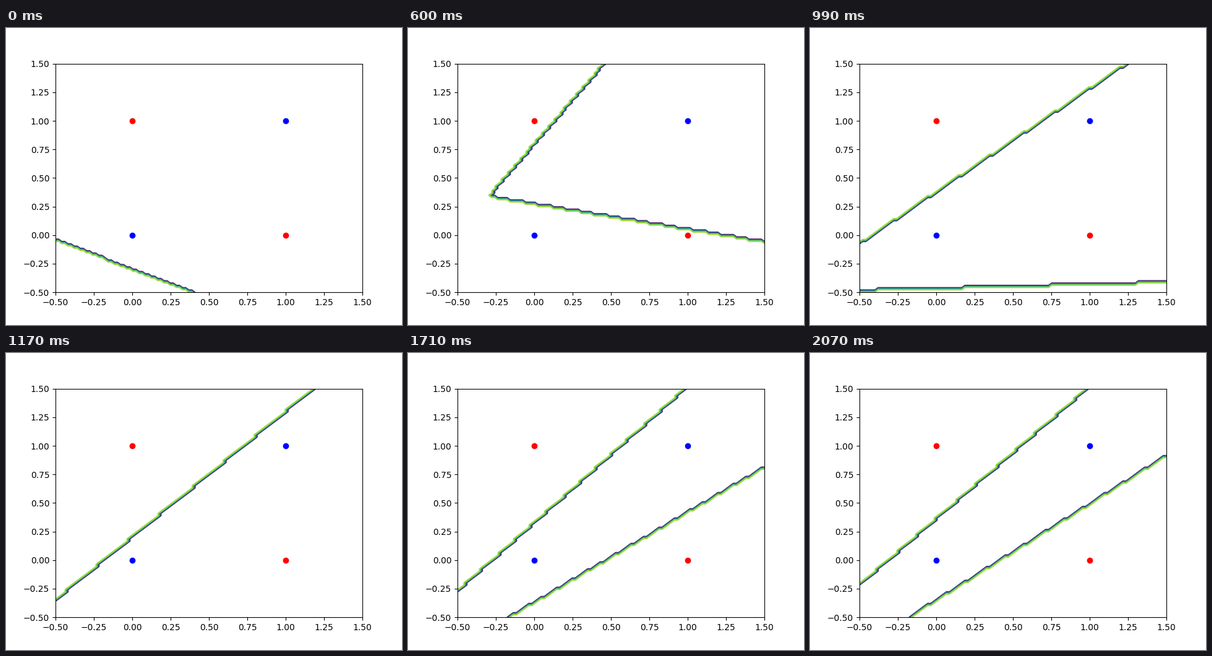
Animation of 640 by 480 pixels, one loop 2100 ms. Source, as a matplotlib script:

```python
import numpy as np
import matplotlib.pyplot as plt
from matplotlib.animation import FuncAnimation

FRAMES, STEP = 70, 30
N = 100
MID = (N - 1) / 2

axis = np.linspace(-0.5, 1.5, N)
col, row = np.meshgrid(np.arange(N) - MID, np.arange(N) - MID)


def line(start, slope):
    """Angle and signed distance from the grid centre, in cells."""
    angle = np.arctan(slope)
    return angle, (start + slope * MID - MID) * np.cos(angle)


# Two decision lines: time -> (angle, distance)
UPPER = {
    0: (np.radians(100), 75),
    12: line(16.65, 6.1),
    27: line(32.6, 0.74),
    39: line(7.656, 1.0984),
    47: line(6.38, 1.133),
    57: line(11.5, 1.191),
    69: line(14.11, 1.156),
}
LOWER = {
    0: line(22.675, -0.511),
    12: line(63.5, -0.2556),
    27: line(26.67, -0.1925),
    39: (np.radians(15), -62),
    47: line(-20.96, 0.54),
    57: line(-13.06, 0.7875),
    69: line(-13.51, 0.8425),
}


def height(keys, t):
    """Signed distance of every grid cell above the moving line."""
    angle, dist = (np.interp(t, list(keys), v) for v in zip(*keys.values()))
    return row * np.cos(angle) - col * np.sin(angle) - dist


def classify(t):
    return ((height(UPPER, t) > 0) | (height(LOWER, t) < 0)).astype(float)


fig, ax = plt.subplots(figsize=(6.4, 4.8), dpi=100)
ax.set(xlim=(-0.5, 1.5), ylim=(-0.5, 1.5))
ax.autoscale(False)
ax.plot([0, 1], [0, 1], "bo")
ax.plot([0, 1], [1, 0], "ro")

shown = []


def clear():
    while shown:
        shown.pop().remove()
    return []


def draw(t):
    clear()
    shown.append(ax.contour(axis, axis, classify(t)))
    return []


anim = FuncAnimation(fig, draw, frames=FRAMES, init_func=clear,
                     interval=STEP, repeat=True, repeat_delay=0)
plt.show()
```
